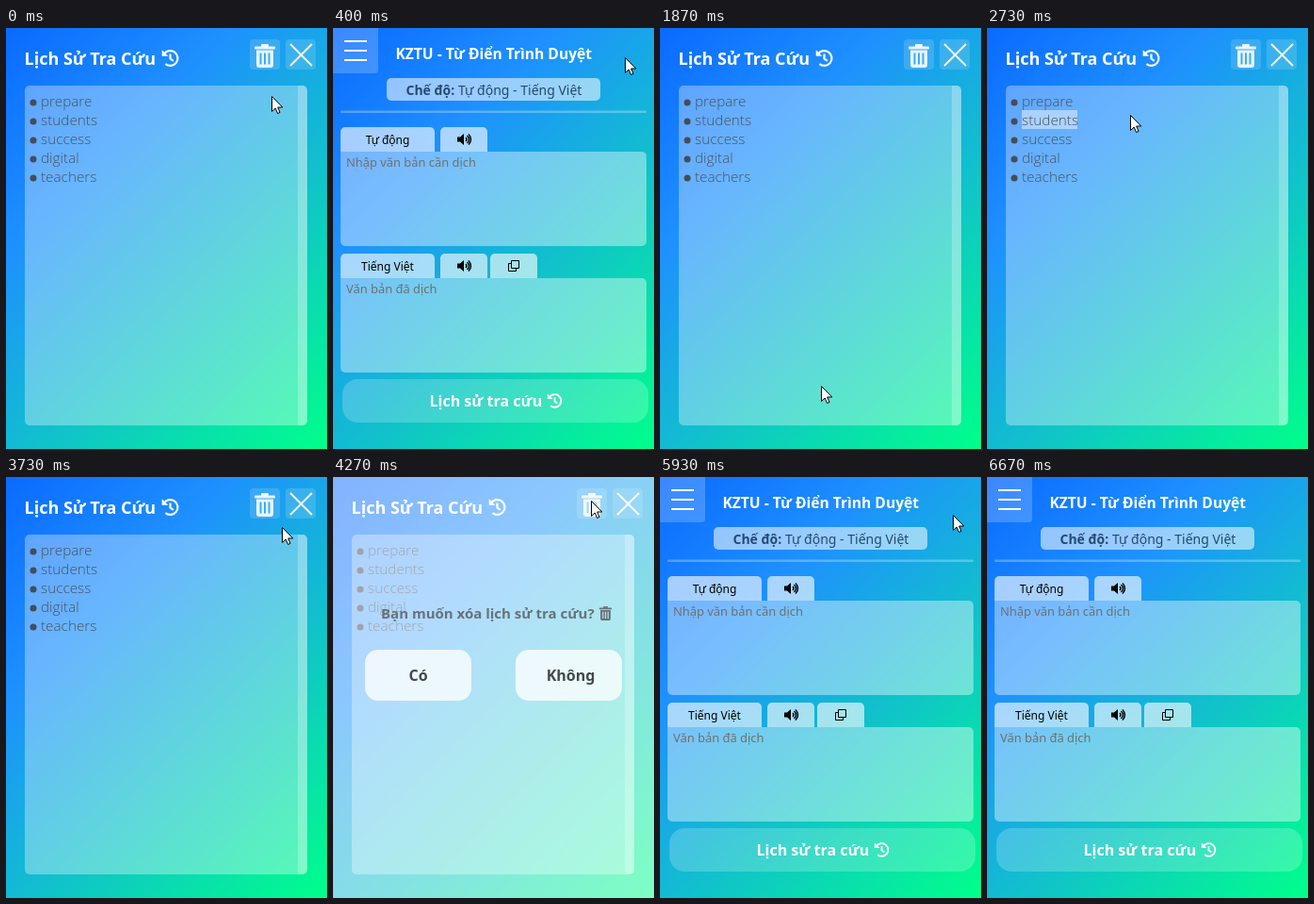
Recreate the animation shown at these times as an HTML page with a canvas. Size 341 px wide and 446 px high, loop 7990 ms.

```html
<!DOCTYPE html>
<html lang="vi">
<head>
<meta charset="utf-8">
<style>
  html, body { margin: 0; width: 100%; height: 100%; overflow: hidden; }
  canvas { display: block; width: 341px; height: 446px; }
</style>
</head>
<body>
<canvas id="stage" width="341" height="446"></canvas>
<script>
const ctx = document.getElementById('stage').getContext('2d');
const LOOP = 7990;
const WORDS = ['prepare', 'students', 'success', 'digital', 'teachers'];
const white = a => `rgba(255,255,255,${a})`;
const clamp = v => Math.max(0, Math.min(1, v));
const ease = k => k * k * (3 - 2 * k);

const TRASH = { x: 259, y: 12, w: 32, h: 32 };
const CLOSE = { x: 297, y: 12, w: 32, h: 32 };
const YES = { x: 34, y: 183, w: 113, h: 54 };
const NO = { x: 194, y: 183, w: 113, h: 54 };
const OPEN = { x: 10, y: 372, w: 325, h: 46 };

// Eased pointer moves; bow bends the way sideways
const GLIDES = [
  { from: 0, to: 250, x: 310, y: 31, bow: 0 },
  { from: 410, to: 1250, x: 165, y: 396, bow: 0 },
  { from: 1780, to: 2500, x: 70, y: 89, bow: .25 },
  { from: 2550, to: 2890, x: 219, y: 95, bow: 0 },
  { from: 3220, to: 3870, x: 274, y: 25, bow: 1 },
  { from: 4280, to: 4670, x: 90, y: 205, bow: 0 },
  { from: 5140, to: 5660, x: 310, y: 31, bow: 0 },
  { from: 5860, to: 6660, x: 298, y: 448, bow: -.05 }
];

function pointerAt(t) {
  if (t > GLIDES.at(-1).to) return null;
  let p = { x: 282, y: 72 };
  for (const g of GLIDES) {
    const k = ease(clamp((t - g.from) / (g.to - g.from)));
    const dx = g.x - p.x, dy = g.y - p.y, bend = g.bow * Math.sin(Math.PI * k);
    p = { x: p.x + dx * k - dy * bend, y: p.y + dy * k + dx * bend };
    if (k < 1) break;
  }
  return p;
}

const over = (p, r) => p && p.x >= r.x && p.x < r.x + r.w && p.y >= r.y && p.y < r.y + r.h;

function box({ x, y, w, h }, fill, radius = 0) {
  ctx.fillStyle = fill;
  ctx.beginPath();
  ctx.roundRect(x, y, w, h, radius);
  ctx.fill();
}

const rect = (x, y, w, h, fill, radius) => box({ x, y, w, h }, fill, radius);

function text(str, x, y, size, weight, fill, align = 'left', family = 'Noto Sans') {
  ctx.font = `${weight} ${size}px "${family}", sans-serif`;
  ctx.textAlign = align;
  ctx.fillStyle = fill;
  ctx.fillText(str, x, y);
  return ctx.measureText(str).width;
}

function stroke(d, color, width) {
  ctx.strokeStyle = color;
  ctx.lineWidth = width;
  ctx.stroke(new Path2D(d));
}

// Runs draw() with the origin moved to x, y
function at(x, y, scale, draw) {
  ctx.save();
  ctx.translate(x, y);
  ctx.scale(scale, scale);
  draw();
  ctx.restore();
}

function historyIcon(x, y, scale) {
  at(x, y, scale, () => {
    stroke('M-6-4A7.2 7.2 0 1 1-4.6 5.5M0-4V.5L3 2.7', '#fff', 2);
    ctx.fillStyle = '#fff';
    ctx.fill(new Path2D('M-8-8V-2H-2Z'));
  });
}

function speakerIcon(x, y) {
  at(x, y, 1, () => {
    ctx.fillStyle = '#000';
    ctx.fill(new Path2D('M-7-2.5H-4L0-6V6L-4 2.5H-7Z'));
    stroke('M2-2Q4 0 2 2M3.5-4Q7.5 0 3.5 4M5-5.6Q10 0 5 5.6', '#000', 1.4);
  });
}

function trashIcon(x, y, scale, color) {
  at(x, y, scale, () => {
    rect(-11, -10, 22, 3, color, 1);
    rect(-4, -12.5, 8, 3, color, 1);
    ctx.beginPath();
    ctx.roundRect(-9, -6, 18, 18.5, [0, 0, 3, 3]);
    for (let i = -1; i <= 1; i++) ctx.rect(i * 4.5 - 1, -3, 2, 12);
    ctx.fill('evenodd');
  });
}

function background() {
  const g = ctx.createLinearGradient(-26, 26, 367.5, 419.5);
  g.addColorStop(0, '#0a6aff');
  g.addColorStop(.3, '#1e90ff');
  g.addColorStop(1, '#00ff8a');
  ctx.fillStyle = g;
  ctx.fillRect(0, 0, 341, 446);
}

function panel(y, label, hint, tabs) {
  const tab = (x, w) => rect(x, y, w, 26, white(.62), [5, 5, 0, 0]);
  tab(8, 100);
  for (let i = 0; i < tabs; i++) tab(114 + i * 53, 50);
  text(label, 58, y + 18, 12, 400, '#000', 'center');
  speakerIcon(139, y + 13);
  rect(8, y + 26, 325, 100, white(.4), [0, 5, 5, 5]);
  text(hint, 14, y + 42, 12.9, 500, '#707070');
}

function historyButton(hover) {
  if (hover) {
    ctx.save();
    ctx.beginPath();
    ctx.rect(0, 0, 341, 446);
    ctx.roundRect(OPEN.x, OPEN.y, OPEN.w, OPEN.h, 16);
    ctx.clip('evenodd');
    ctx.shadowColor = white(.38);
    ctx.shadowBlur = 15;
    ctx.shadowOffsetY = 5;
    box(OPEN, '#fff', 16);
    ctx.restore();
  }
  box(OPEN, white(hover ? .42 : .2), 16);
  text('Lịch sử tra cứu', 102.5, 401, 16, 700, '#fff');
  historyIcon(235.5, 395, .95);
}

function mainScreen(pointer) {
  rect(0, 0, 48, 48, white(.2), [0, 0, 4, 0]);
  stroke('M12 14H36M12 24H36M12 34H36', '#fff', 2);
  text('KZTU - Từ Điển Trình Duyệt', 275, 33, 15.6, 700, '#fff', 'right');

  rect(57, 53, 227, 24, white(.55), 5);
  const ink = '#234a70';
  const w = text('Chế độ:', 77.5, 71, 14, 700, ink);
  text(' Tự động - Tiếng Việt', 77.5 + w, 71, 14, 500, ink);
  rect(8, 87.5, 325, 2.5, white(.27), 1);

  panel(105, 'Tự động', 'Nhập văn bản cần dịch', 1);
  panel(239, 'Tiếng Việt', 'Văn bản đã dịch', 2);
  stroke('M189.5 246.5H197.5V254.5H189.5ZM189 249.5H186.5V257.5H194.5V255', '#000', 1);
  historyButton(over(pointer, OPEN));
}

function historyScreen(t) {
  text('Lịch Sử Tra Cứu', 19.5, 39, 18, 700, '#fff');
  historyIcon(174.5, 32, 1.1);
  box(TRASH, white(.15), 4);
  trashIcon(275, 29.5, 1, white(.88));
  box(CLOSE, white(.15), 4);
  stroke('M302 17L325 40M325 17L302 40', white(.92), 2);

  rect(20, 61, 300, 360, white(.33), 5);
  rect(310, 61, 10, 360, white(.24), [0, 5, 5, 0]);

  const ink = '#48525c';
  if (t > 4930) {
    text('Lịch sử trống', 24.5, 83, 14, 700, ink);
    stroke('M131.8 75A4.9 4.9 0 1 1 122 75A4.9 4.9 0 1 1 131.8 75M130.3 78.5L135 83', ink, 2.3);
    return;
  }
  if (t > 2500 && t < 3070) rect(37, 87, 59, 20, white(.45));
  WORDS.forEach((word, i) => {
    const y = 78 + i * 20;
    rect(25.5, y - 2.5, 7, 7, '#454d58', 3.5);
    text(word, 37, y + 5, 15.3, 300, ink, 'left', 'Open Sans');
  });
}

function dialog(opacity) {
  ctx.save();
  ctx.globalAlpha = opacity;
  rect(0, 0, 341, 446, white(.55));
  text('Bạn muốn xóa lịch sử tra cứu?', 51, 150, 15, 700, '#5d6467');
  trashIcon(289.5, 144.5, .6, '#5d6467');
  box(YES, white(.88), 14);
  box(NO, white(.88), 14);
  text('Có', 90.5, 215.5, 16, 700, '#2c3133', 'center');
  text('Không', 252.5, 215.5, 16, 700, '#2c3133', 'center');
  ctx.restore();
}

const ARROW = 'M.5.5V16.5L4.2 13L6.6 18.5L9 17.4L6.7 12H11.8Z';
const HAND = 'M-1.5 1.5Q0-1 1.5 1.5V7Q4 5.5 4.5 8Q7 6.5 7.3 9Q9.5 8 9.5 11V15L7.5 18.5V21.5H-2.5V19L-7 12.5Q-7.5 10-5 10.5L-1.5 14Z';

function drawPointer(p, kind) {
  at(Math.round(p.x), Math.round(p.y), 1, () => {
    if (kind === 'text') {
      stroke('M-3-7.5H3M0-7.5V7.5M-3 7.5H3', '#000', 1);
      return;
    }
    const d = kind === 'hand' ? HAND : ARROW;
    ctx.fillStyle = '#fff';
    ctx.fill(new Path2D(d));
    stroke(d, '#000', 1);
    if (kind === 'hand') stroke('M1.5 7V11M4.5 8V11.5M7.3 9V12', '#000', 1);
  });
}

function pointerKind(p, onHistory, asking, t) {
  const buttons = !onHistory ? [OPEN] : asking ? [YES, NO] : [TRASH, CLOSE];
  if (buttons.some(b => over(p, b))) return 'hand';
  const onWords = onHistory && !asking && t < 4930 && over(p, { x: 37, y: 68, w: 59, h: 100 });
  return onWords ? 'text' : 'arrow';
}

function render(t) {
  const onHistory = t < 330 || (t >= 1395 && t < 5725);
  const opening = t < 4268 ? 0 : clamp(.88 + (t - 4268) / 1000);
  const opacity = Math.min(opening, clamp((5130 - t) / 200));
  const pointer = pointerAt(t);

  background();
  if (onHistory) historyScreen(t);
  else mainScreen(pointer);
  if (opacity > 0) dialog(opacity);
  if (pointer) drawPointer(pointer, pointerKind(pointer, onHistory, opacity > 0, t));
}

function tick() {
  render(performance.now() % LOOP);
  requestAnimationFrame(tick);
}
tick();
</script>
</body>
</html>
```
